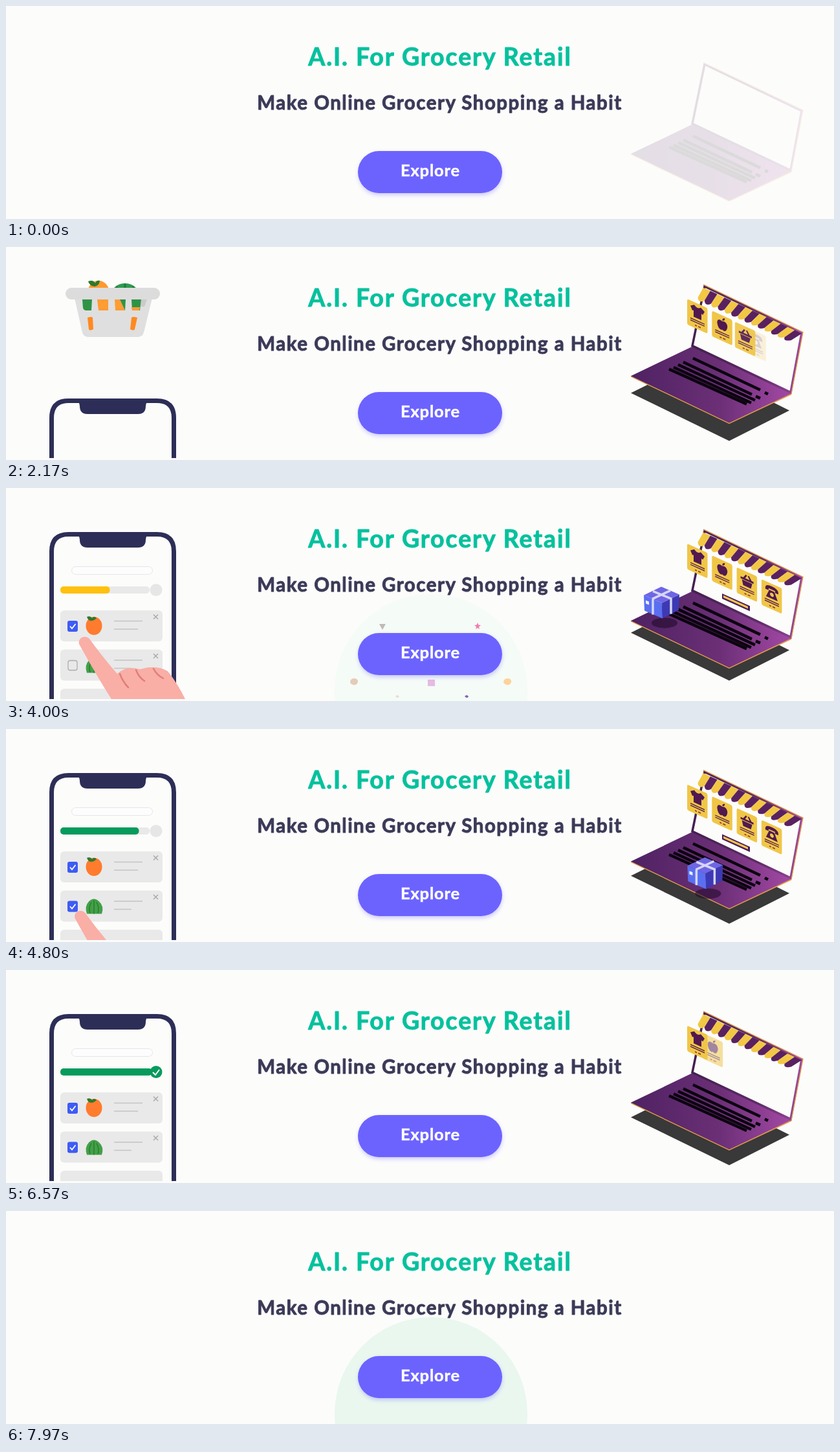
Animation of 1280 by 329 pixels, one loop 8 s. Source, as an HTML page:

```html
<!DOCTYPE html>
<html lang="en">
<head>
<meta charset="utf-8">
<title>Grocery banner</title>
<style>
html, body { margin: 0; width: 100%; height: 100%; overflow: hidden; background: #fcfcfb; }
svg { display: block; width: 100vw; height: 100vh; }
text { font-family: Lato, "Open Sans", sans-serif; font-weight: 700; text-anchor: middle; stroke-width: .9; stroke-linejoin: round; }
</style>
</head>
<body>
<svg viewBox="0 0 1280 329">
  <defs>
    <clipPath id="panel"><rect x="0" y="12" width="340" height="314"/></clipPath>
    <linearGradient id="deck" x1="0" y1="0" x2="1" y2="0">
      <stop offset="0" stop-color="#4e2262"/><stop offset=".55" stop-color="#6b2f76"/><stop offset="1" stop-color="#a349a5"/>
    </linearGradient>
    <linearGradient id="lid" x1="0" y1="0" x2="1" y2="0">
      <stop offset="0" stop-color="#43204f"/><stop offset=".6" stop-color="#5e2b66"/><stop offset="1" stop-color="#9a4aa0"/>
    </linearGradient>
    <filter id="soft" x="-20%" y="-30%" width="140%" height="170%"><feGaussianBlur stdDeviation="3"/></filter>
  </defs>
  <rect width="1280" height="329" fill="#fcfcfb"/>

  <circle id="pulse" cx="657" cy="313" r="0" fill="#e9f7ef"/>
  <g id="confetti"></g>
  <text x="671" y="92" font-size="37.5" letter-spacing="1.9" fill="#04c19d" stroke="#04c19d">A.I. For Grocery Retail</text>
  <text x="670.5" y="160" font-size="29.5" letter-spacing="1.48" fill="#3b3a58" stroke="#3b3a58">Make Online Grocery Shopping a Habit</text>
  <rect x="545" y="227" width="222" height="65" rx="32" fill="#6c63ff" opacity=".34" filter="url(#soft)"/>
  <rect x="544" y="224" width="223" height="65" rx="32.5" fill="#6c63ff"/>
  <text x="656" y="263" font-size="25.5" letter-spacing=".85" fill="#fff" stroke="#fff" style="stroke-width:.5">Explore</text>

  <g clip-path="url(#panel)">
    <g id="basket">
      <g id="melon"><circle cx="184" cy="79" r="24" fill="#2f9a50"/>
        <path d="M172 60Q166 70 166 80M184 56V80M196 60Q202 70 202 80" fill="none" stroke="#1f7a3c" stroke-width="3"/></g>
      <g id="orange"><circle cx="143" cy="67" r="16" fill="#ff9a2e"/>
        <path d="M127 52Q135 49 138 55Q140 50 145 51Q144 59 137 60Q129 59 127 52Z" fill="#2b7a2c"/></g>
      <path d="M106 78H226L213 131Q211 138 204 138H127Q120 138 118 131Z" fill="#dfdfdf"/>
      <path d="M209 80h9l-4 11h-6Z" fill="#cacaca"/>
      <path d="M118 80h15l-1 17h-8q-4 0-5-4ZM194 80h15l-2 17h-12Z" fill="#2f9346"/>
      <path d="M141 80h17v17h-15ZM168 80h8l8 17h-15ZM194 92h13l-1 5h-11Z" fill="#ff9c33"/>
      <path d="M176 80h9l-1 17Z" fill="#2f9346"/>
      <path d="M126 108q6-2 8 0l1 18q-6 3-7 0ZM203 108q-7-2-9 0l-2 18q6 3 7 0Z" fill="#ff8a1f"/>
      <rect x="92" y="62" width="146" height="18" rx="9" fill="#dcdcdc"/>
    </g>

    <g id="phone">
      <path d="M70.5 420V98Q70.5 71.500 96.500 71.500H233.500Q259.500 71.500 259.500 98V420" fill="#fcfcfb" stroke="#2d2e57" stroke-width="7"/>
      <path d="M108 70H222Q216 74 216 80Q216 92 204 92H126Q114 92 114 80Q114 74 108 70Z" fill="#2d2e57"/>
      <g id="bars">
        <rect x="101.500" y="121.500" width="125" height="12" rx="6" fill="#fdfdfd" stroke="#e6e6e6"/>
        <rect x="84" y="152" width="138" height="11" rx="5" fill="#e9e9e9"/>
        <rect id="fill" x="84" y="152" width="0" height="11" rx="5"/>
        <circle id="knob" cx="232" cy="157.500" r="9.500" fill="#e6e6e6"/>
        <path id="done" d="M227 158l4 4 6-8" fill="none" stroke="#fff" stroke-width="2"/>
      </g>
      <g id="items"></g>
    </g>

    <g id="hand">
      <path d="M113 241C111 231 122 226 129 233Q150 262 172 287Q186 274 207 280Q232 272 250 283Q264 300 277 326L320 440H215L163 326Q140 290 113 241Z" fill="#f9aea6"/>
      <path d="M176 287Q181 300 189 308M201 281Q205 292 214 298M228 279Q233 289 243 294" fill="none" stroke="#df7f78" stroke-width="2.500" stroke-linecap="round"/>
    </g>
  </g>

  <g id="laptop">
    <path id="shade" d="M966 225.500L1062 178L1211 252.500L1118 299.500Z" fill="#393939"/>
    <path d="M966 200L1118 272.500L1214 227.500V224L1118 268L966 198Z" fill="#e39c48"/>
    <path d="M966 198.500L1062 152.500L1214 225.500L1118 271Z" fill="url(#deck)"/>
    <path d="M1062 171L1166 220M1173 224l5 2.500M1047 177L1153 227M1159 230l7 3M1039 181L1158 236M1032 185L1152 240M1025 188L1145 242" stroke="#0c0410" stroke-width="4.500"/>
    <path d="M1080 60L1230 132L1213 224L1061 152Z" fill="#fcfcfb" stroke="url(#lid)" stroke-width="3.500"/>
    <path d="M1078 57.500L1232 131L1214 226" fill="none" stroke="#e39a45" stroke-width="1.300"/>
    <g id="awning"></g>
    <g id="cards"></g>
    <g id="cta" transform="matrix(1 .45 0 1 1107 156.500)">
      <rect width="43" height="8" fill="#4b1a5c"/><rect x="2" y="2" width="38" height="3.500" fill="#f0c546"/>
    </g>
    <g id="parcel">
      <ellipse cx="5" cy="31" rx="20" ry="8" fill="#1c0826" opacity=".55"/>
      <path d="M-27-12L1 0L2 24L-26 12Z" fill="#5a6ff0"/>
      <path d="M1 0L28-13L27 11L2 24Z" fill="#3d39b4"/>
      <path d="M-27-12L0-25L28-13L1 0Z" fill="#6f66e4"/>
      <path d="M-14-6L14-19M-13-18L15-6.500V17M-13-6V18" fill="none" stroke="#d5d6f7" stroke-width="3.500"/>
      <path d="M-24-4l5 2v5l-5-2Z" fill="#eef"/>
    </g>
  </g>
</svg>

<script>
const LOOP = 8000, NS = 'http://www.w3.org/2000/svg';
const $ = id => document.getElementById(id);
const clamp = x => Math.max(0, Math.min(1, x));
const lerp = (a, b, k) => a + (b - a) * k;
const span = (t, a, b) => clamp((t - a) / (b - a));
const inOut = x => x < .5 ? 4 * x ** 3 : 1 - (2 - 2 * x) ** 3 / 2;
const out = x => 1 - (1 - x) ** 3;
const smooth = x => x * x * (3 - 2 * x);

// Value of a list of [time, value] steps
function track(t, steps, ease = smooth) {
  if (t <= steps[0][0]) return steps[0][1];
  for (let i = 1; i < steps.length; i++) {
    const [a, from] = steps[i - 1], [b, to] = steps[i];
    if (t < b) return lerp(from, to, ease((t - a) / (b - a)));
  }
  return steps[steps.length - 1][1];
}
function add(parent, tag, attrs, html = '') {
  const el = document.createElementNS(NS, tag);
  for (const k in attrs) el.setAttribute(k, attrs[k]);
  el.innerHTML = html;
  parent.append(el);
  return el;
}
const set = (el, name, value) => el.setAttribute(name, value);
const move = (el, x, y, more = '') => set(el, 'transform', `translate(${x} ${y}) ${more}`);

// Shopping list rows
const produce = [
  `<ellipse cx="136" cy="213" rx="12.500" ry="14" fill="#ff7b2e"/>
   <path d="M125 199q6-2 8 2q3-4 7 0q-4 4-8 4q-5 0-7-6Z" fill="#2c7a2c"/>`,
  `<path d="M125 225Q121 213 128 206Q136 198 144 206Q152 213 148 225Z" fill="#43a047"/>
   <path d="M130 224q-3-8 2-17M136 225v-21M142 224q3-8-2-17" fill="none" stroke="#2a7d33" stroke-width="1.500"/>`, ''];
const rows = produce.map((art, i) => {
  const row = add($('items'), 'g', {}, `
    <rect x="84" y="189" width="158" height="48" rx="6" fill="#e9e9e9"/>` + (art && `
    <path d="M228 195.500l7 7m0-7l-7 7" stroke="#a5a5a5" stroke-width="1.300"/>
    <path d="M167 205.500h44M167 218h${i ? 27 : 37}" stroke="#c4c4c4" stroke-width="1.500"/>
    <rect x="96" y="206" width="14" height="15" rx="3" fill="none" stroke="#adadad" stroke-width="1.300"/>
    <g class="tick"><rect x="95" y="205" width="16" height="17" rx="3" fill="#3d5cf5"/>
    <path d="M99 213.500l3 3.500 5.500-7" fill="none" stroke="#fff" stroke-width="1.800"/></g>`) + art);
  return { row, tick: row.querySelector('.tick') };
});

// Awning stripes, each growing from its own middle
const STRIPES = 14;
const stripes = Array.from({ length: STRIPES }, (_, i) =>
  add($('awning'), 'path', { fill: i % 2 ? '#5a2160' : '#f2c744' }));
function drawStripe(el, i, g) {
  const at = (k, d) => {
    const s = (i + .5 + (k - .5) * g) / STRIPES, e = .5 + (d - .5) * g;
    return [lerp(1078, 1230, s) + lerp(-10, -19, s) * e, lerp(62, 133, s) + lerp(18, 12, s) * e];
  };
  set(el, 'd', `M${at(0, 0)}L${at(1, 0)}L${at(1, .85)}Q${at(.5, 1.25)} ${at(0, .85)}Z`);
  set(el, 'visibility', g > .02 ? 'visible' : 'hidden');
}

// Product cards
const icons = [
  'M11 4L5 8L8 14L10 13V23H22V13L24 14L27 8L21 4Q16 9 11 4Z',
  'M16 9Q9 6 8 14Q9 23 14 23L16 22L18 23Q23 23 24 14Q23 6 16 9ZM16 8q0-4 4-5q0 4-4 5Z',
  'M6 11h4l4-6l2 1l-3 5h7l-3-5l2-1l4 6h3v3H6ZM8 15H24L22 23H10Z',
  'M6 9Q7 4 16 4Q25 4 26 9V12H21V9H11V12H6ZM12 11H20L25 23H7ZM16 14a3 3 0 1 0 .1 0Z'];
const cards = icons.map(d => {
  const el = add($('cards'), 'g', {}, `
    <rect width="31.500" height="39.500" rx="2.500" fill="#f0c646"/>
    <path d="${d}" fill="#51194f" fill-rule="evenodd"/>
    <path d="M5 27H27M5 30H27" stroke="#51194f" stroke-width="1.400"/>
    <path d="M12 35h3M17 35h4" stroke="#8a3a3a" stroke-width="1.800"/>`);
  $('cards').prepend(el);
  return el;
});
const cardIn = [1380, 1630, 1910, 2080], cardOut = [6720, 6440, 6180, 5920];

// Confetti: offset from the centre, colour, shape
const shapes = {
  tri: 'M-5-4H5L0 5Z',
  star: 'M0-5L1.500-1.500L5-1L2 1.500L3 5L0 3L-3 5L-2 1.500L-5-1L-1.500-1.500Z',
  dot: 'M-6 0Q-5-5 1-5Q7-4 6 1Q4 6-1 5Q-6 4-6 0Z',
  box: 'M-5-5H6V5H-5Z',
  bit: 'M-3 0Q0-4 3 0Q1 4-3 0Z'
};
const bits = [
  [-75, -76, '#b9b3ae', 'tri'], [72, -77, '#f06fa6', 'star'], [-119, 9, '#e3c7ae', 'dot'],
  [0, 11, '#e4b4e0', 'box'], [118, 9, '#ffcf8f', 'dot'], [-52, 32, '#ead9cf', 'bit'], [55, 32, '#7a4fb5', 'bit']
].map(([x, y, fill, kind]) => ({ x, y, el: add($('confetti'), 'path', { d: shapes[kind], fill }) }));

function burst(t) {
  const p = t < 6000 ? t - 3400 : t - 7520;
  set($('pulse'), 'r', 149 * out(span(p, 0, 380)));
  set($('pulse'), 'opacity', track(p, [[0, 0], [60, 1], [460, 1], [600, .4], [760, 0]]));
  const k = track(p, [[460, .55], [600, 1], [1050, 1.3]], x => x);
  set($('confetti'), 'opacity', track(p, [[460, 0], [560, .9], [700, .9], [1050, 0]]));
  for (const b of bits) move(b.el, 657 + b.x * k, 290 + b.y * k);
}

function basket(t) {
  const y = t < 620 ? lerp(-130, 98, span(t, 230, 620) ** 2)
    : track(t, [[620, 98], [730, 96], [900, 93]]) - 258 * inOut(span(t, 1903, 2503));
  const turn = track(t, [[560, 0], [730, -2.7], [900, 1.5], [1050, 0]]);
  move($('basket'), 0, y, `rotate(${turn} 165 100)`);
  const sink = track(t, [[560, 0], [720, 1], [900, -.3], [1050, 0]]);
  move($('orange'), 0, sink * 7);
  move($('melon'), 0, sink * 12);
  set($('basket'), 'visibility', t > 230 && t < 2500 ? 'visible' : 'hidden');
}

function phone(t) {
  move($('phone'), 0, 258 * (1 - inOut(span(t, 1903, 2503)) + inOut(span(t, 6880, 7450))));
  set($('bars'), 'opacity', span(t, 2480, 2700));
  rows.forEach(({ row, tick }, i) => {
    const k = out(span(t, 2580 + i * 110, 2880 + i * 110));
    move(row, 0, 60.5 * i + 20 * (1 - k));
    set(row, 'opacity', k);
    if (tick) set(tick, 'opacity', span(t, 3600 + i * 950, 3680 + i * 950));
  });
  const full = t > 4750;
  set($('fill'), 'width', track(t, [[3600, 0], [3950, 76.5], [4550, 76.5], [4950, 142]]));
  set($('fill'), 'fill', full ? '#069b5d' : '#ffc00e');
  set($('knob'), 'fill', t > 4900 ? '#069b5d' : '#e6e6e6');
  set($('done'), 'opacity', span(t, 4900, 5000));
  const x = track(t, [[2900, 70], [3480, -18], [3720, -18], [4000, 0], [4430, -18], [4680, -18], [5250, 80]]);
  const y = track(t, [[2900, 140], [3480, -22], [3720, -22], [4000, 0], [4430, 38], [4680, 38], [5250, 150]]);
  move($('hand'), x, y);
  set($('hand'), 'visibility', t > 2900 && t < 5250 ? 'visible' : 'hidden');
}

function laptop(t) {
  const centre = track(t, [[2500, -1.2], [3500, 2.2]]);
  const bob = 4.2 * Math.cos((t - 4010) / 845 * 2 * Math.PI) * span(t, 500, 1600);
  const gone = span(t, 7180, 7480);
  const y = 30 * (1 - out(span(t, 0, 600))) + centre * span(t, 600, 1200) + bob + 30 * gone * gone;
  move($('laptop'), 0, y);
  set($('laptop'), 'opacity', lerp(.13, 1, span(t, 0, 450)) * (1 - gone));
  const drop = track(t, [[450, -26], [730, -7], [1100, 0], [2170, 0], [4000, -2], [5670, 5], [6570, 2], [7180, 0]]);
  move($('shade'), 0, drop - y);
  set($('shade'), 'opacity', track(t, [[450, 0], [730, .8], [900, 1], [6980, 1], [7180, 0]]));

  stripes.forEach((el, i) => {
    const start = Math.min(530 + 25 * (STRIPES - 1 - i), 630 + 25 * i);
    drawStripe(el, i, smooth(span(t, start, start + 350)) * (1 - smooth(span(t, 6840 + i * 10, 7060 + i * 10))));
  });
  cards.forEach((el, i) => {
    const k = smooth(span(t, cardIn[i], cardIn[i] + 320)) * (1 - smooth(span(t, cardOut[i], cardOut[i] + 270)));
    const n = i ? i - .8 * (1 - k) : 0;
    set(el, 'transform', `matrix(1 .45 0 1 ${1053 + 38.3 * n} ${79.5 + 18.3 * n})`);
    set(el, 'opacity', k);
  });
  set($('cta'), 'opacity', span(t, 2560, 2760) * (1 - span(t, 5880, 6050)));
  const k = track(t, [[3350, -.3], [3900, 0], [4050, 0], [4900, 1]]);
  move($('parcel'), 1013 + 70 * k, 171 + 48 * k);
  set($('parcel'), 'opacity', span(t, 3350, 3650) * (1 - span(t, 5600, 5880)));
}

const begin = performance.now();
function frame() {
  const t = (performance.now() - begin) % LOOP;
  burst(t);
  basket(t);
  phone(t);
  laptop(t);
  requestAnimationFrame(frame);
}
frame();
</script>
</body>
</html>
```
